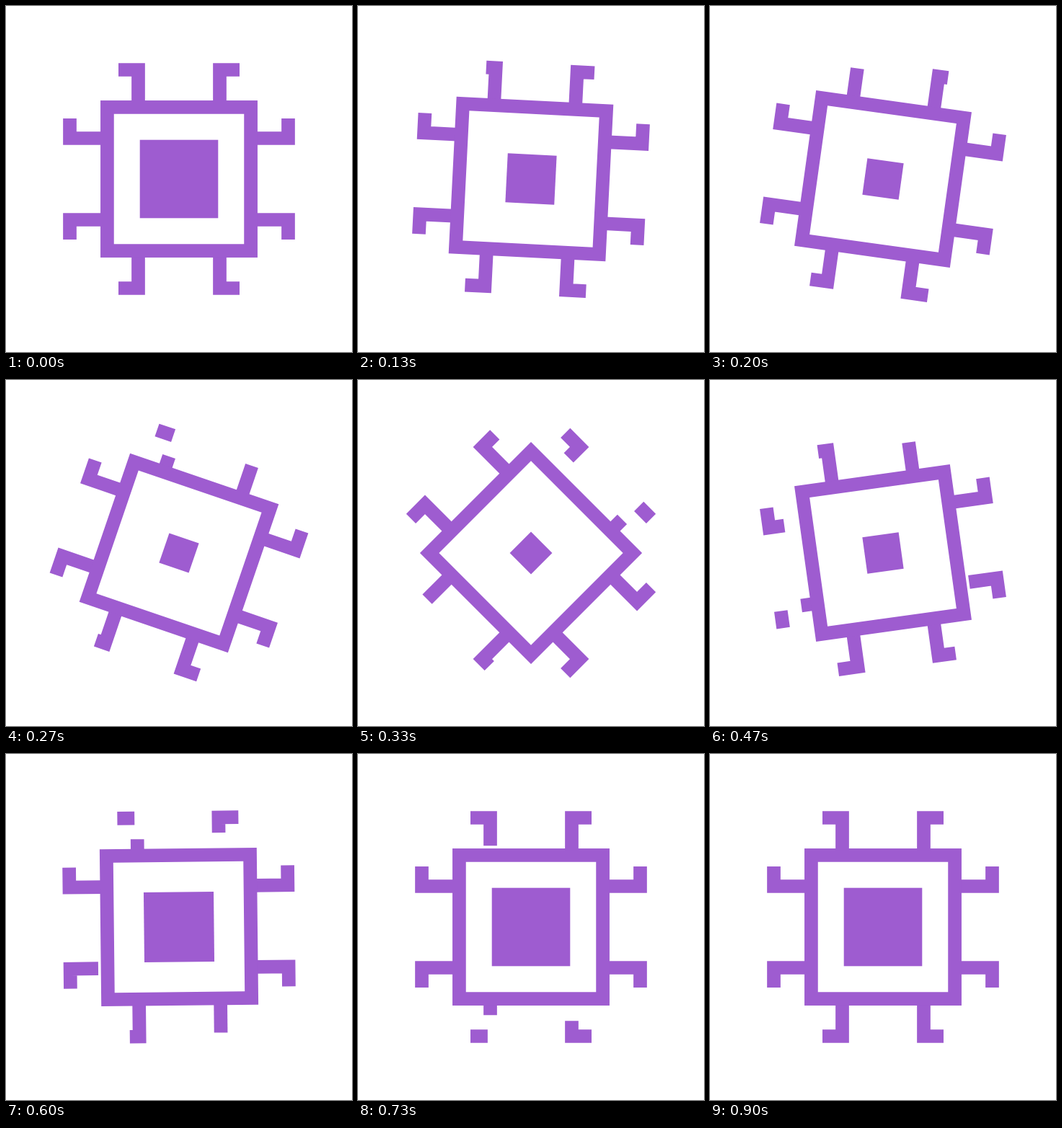
Animation, 480 px wide and 480 px high, one loop 1.13 s. Source, as an HTML page with a canvas:

```html
<!DOCTYPE html>
<html lang="en">
<head>
<meta charset="utf-8">
<title>Chip loader</title>
<style>
  html, body { margin: 0; width: 100%; height: 100%; overflow: hidden; background: #fff; }
  canvas { display: block; width: 100vw; height: 100vh; }
</style>
</head>
<body>
<canvas id="stage" width="480" height="480"></canvas>
<script>
const ctx = document.getElementById('stage').getContext('2d');
const COLOR = '#9e5cd0';
const LOOP = 1130;
const LAST = 27;
const LINE = 18.7;
const FRAME = 99.6;
const CORE = 108.6;
const CORE_MIN = 41.6;

// Pins in starting order: [quarter turns, mirror]
const PINS = [[0, -1], [0, 1], [2, 1], [2, -1], [3, 1], [3, -1], [1, -1], [1, 1]];
const STAGGER = 2;
const PIN_VISIBLE = 70;

const clamp = (v, lo, hi) => Math.min(hi, Math.max(lo, v));

// Cubic Bezier easing with control points (x1, 0) and (x2, 1)
function bezier(x1, x2) {
  return p => {
    if (p <= 0) return 0;
    if (p >= 1) return 1;
    let lo = 0, hi = 1, s = 0.5;
    for (let i = 0; i < 30; i++) {
      s = (lo + hi) / 2;
      const r = 1 - s;
      const x = 3 * x1 * s * r * r + 3 * x2 * s * s * r + s * s * s;
      if (x < p) lo = s; else hi = s;
    }
    return s * s * (3 - 2 * s);
  };
}

const spin = bezier(0.744, 0.256);
const shrink = bezier(0.33, 0.26);

// 30 steps per second, on a 10 ms clock
function stepAt(ms) {
  const tick = Math.floor(ms / 10) * 10;
  return Math.min(LAST, Math.floor((tick + 4) * 0.03));
}

// A gap runs along the pin from its tip into the frame
function setGap(k) {
  const front = k > 0 ? Math.min(80, 0.885 * k * k) : 0;
  const back = clamp(80.5 - 0.885 * (16 - Math.min(k, 16)) ** 2, 0, 80);
  const whole = front === 0 || back >= PIN_VISIBLE;
  ctx.setLineDash(whole ? [] : [back, front - back, 200, 0]);
}

function drawPin([turns, side], k) {
  ctx.save();
  ctx.rotate(turns * Math.PI / 2);
  setGap(k);
  ctx.beginPath();
  ctx.moveTo(side * 84, -151.5);
  ctx.lineTo(side * 56.5, -151.5);
  ctx.lineTo(side * 56.5, -105);
  ctx.stroke();
  ctx.restore();
}

function draw(ms) {
  const k = stepAt(ms);
  ctx.setTransform(1, 0, 0, 1, 0, 0);
  ctx.fillStyle = '#fff';
  ctx.fillRect(0, 0, 480, 480);

  ctx.translate(240, 240);
  ctx.rotate(spin(k / 20) * Math.PI / 2);
  ctx.fillStyle = ctx.strokeStyle = COLOR;
  ctx.lineWidth = LINE;
  ctx.lineJoin = 'miter';

  PINS.forEach((pin, i) => drawPin(pin, k - i * STAGGER));
  ctx.strokeRect(-FRAME, -FRAME, FRAME * 2, FRAME * 2);

  const size = CORE + (CORE_MIN - CORE) * shrink(1 - Math.abs(k - 10) / 10);
  ctx.fillRect(-size / 2, -size / 2, size, size);
}

const start = performance.now();
function loop() {
  draw((performance.now() - start) % LOOP);
  requestAnimationFrame(loop);
}
loop();
</script>
</body>
</html>
```
